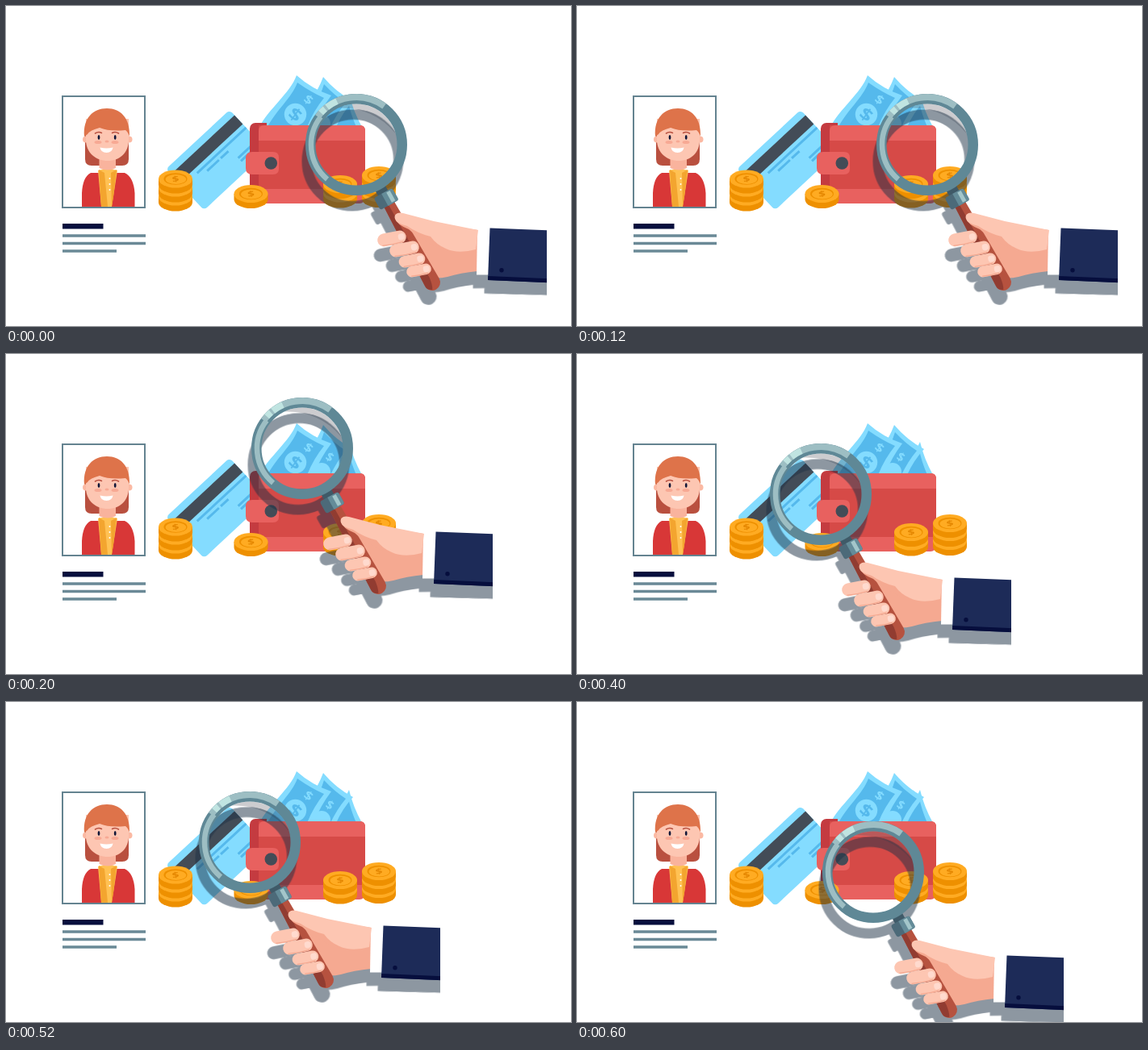
These frames come from a looping animation (700x397 px, 0.8 s). An HTML page:

```html
<!DOCTYPE html>
<html lang="en">
<head>
<meta charset="utf-8">
<title>Checking finances</title>
<style>
html, body { margin: 0; width: 100%; height: 100%; overflow: hidden; background: #fff; }
svg { display: block; width: 100vw; height: 100vh; }
text { font: bold 20px "Open Sans", sans-serif; text-anchor: middle; }
</style>
</head>
<body>
<svg viewBox="0 0 700 397">
  <defs>
    <clipPath id="edge"><rect x="340" y="90" width="330" height="300"/></clipPath>
    <clipPath id="purse"><rect x="302" y="145" width="143" height="100" rx="7"/></clipPath>
    <filter id="tint" color-interpolation-filters="sRGB">
      <feFlood flood-color="#1b2f43" flood-opacity=".5"/>
      <feComposite in2="SourceAlpha" operator="in"/>
    </filter>
    <g id="disc">
      <path d="M-21 0v7a21 11 0 0 0 42 0v-7z" fill="#ee9000"/>
      <ellipse rx="21" ry="11" fill="#ffab22"/>
    </g>
    <g id="face">
      <ellipse rx="14.5" ry="7.3" fill="#ee9000"/>
      <ellipse cx=".4" cy=".6" rx="12.8" ry="6" fill="#ffab22"/>
      <text transform="rotate(-12) scale(1.25 .8)" y="4.3" style="font-size:12px" fill="#e48600">$</text>
    </g>
  </defs>

  <!-- profile -->
  <rect x="70" y="112" width="102" height="138" fill="#fff" stroke="#648390" stroke-width="2"/>
  <path d="M98 152V190Q98 198 106 198H144Q152 198 152 190V152z" fill="#b9503f"/>
  <path d="M94 249V232Q95 212 105 207H147Q158 212 159.500 232V249z" fill="#d83737"/>
  <path d="M114 204L126 201 138 204 131 249H118z" fill="#ffc153"/>
  <path d="M115.500 188h20.500v13q-10 5-20.500 0z" fill="#f9b39d"/>
  <path d="M115 203l7 4 4 42h-8zM137 203l-7 4 1 42 2-12z" fill="#f3a52f"/>
  <g fill="#fff"><circle cx="128.500" cy="214" r="1"/><circle cx="128.500" cy="221" r="1"/><circle cx="128.500" cy="228" r="1"/></g>
  <g fill="#fbb9a3"><circle cx="99" cy="165.500" r="4"/><circle cx="152.500" cy="165.500" r="4"/></g>
  <path d="M99 140H152V166C152 182 141 192 126 192S99 182 99 166z" fill="#fdc6b2"/>
  <path d="M97 162C95 139 108 127 125 127S154 139 153 162Q151 156 148 154 128 156 116 151 104 154 101 159z" fill="#de734a"/>
  <path d="M110.500 158q4-2.500 8-.5M131.500 157.500q4-2 8 .5" fill="none" stroke="#b9503f" stroke-width="1.500" stroke-linecap="round"/>
  <g fill="#101638"><ellipse cx="115" cy="163" rx="1.400" ry="2.900"/><ellipse cx="135.200" cy="163" rx="1.400" ry="2.900"/></g>
  <g fill="#f7a994"><ellipse cx="114" cy="169" rx="4.500" ry="2"/><ellipse cx="135" cy="169" rx="4.500" ry="2"/><ellipse cx="125" cy="168" rx="2.500" ry="1.500"/></g>
  <path d="M116.500 175.500q8 2 16 0-1 6.500-8 6.500t-8-6.500z" fill="#fff"/>
  <rect x="70" y="270" width="50.500" height="6.500" fill="#060e3d"/>
  <path d="M70 285h103M70 294.500h103M70 304h67" stroke="#6a8996" stroke-width="3.700"/>

  <!-- card -->
  <g transform="translate(198 202.500) rotate(-43)">
    <rect width="108" height="69.500" rx="5" fill="#84dcff"/>
    <path d="M0 9H108V24H0z" fill="#434c57"/>
    <path d="M25 30H108M36 36.500H56M59 36.500H72M75 51H108M75 56H108" stroke="#55b9ec" stroke-width="3"/>
  </g>

  <!-- banknotes -->
  <g fill="#84dcff">
    <path d="M425 109Q430 130 441 150H395Q416 130 425 109z"/>
    <path d="M424 119Q427 134 434 150H402Q418 134 424 119z" fill="#55b9ec"/>
    <path d="M393 88Q409 107 430 118 417 132 409 150H350Q381 120 393 88z"/>
    <path d="M394 97Q407 111 421 120 410 133 402 150H360Q386 124 394 97z" fill="#55b9ec"/>
    <text transform="translate(401 128) rotate(32)" y="5" style="font-size:15px">$</text>
    <circle cx="391" cy="146" r="11"/>
    <path d="M360 86Q379 103 403 111 390 128 381 150H314C325 128 352 108 360 86z"/>
    <path d="M361 95Q378 107 394 114 381 130 373 150H324C334 130 354 114 361 95z" fill="#55b9ec"/>
    <circle cx="358.500" cy="134.500" r="13.700"/>
    <text transform="translate(375 116) rotate(36) scale(1.200 1)" y="5.500" style="font-size:15px">$</text>
    <text transform="translate(358.500 134.500) rotate(36) scale(1.250 1)" y="7.500" style="font-size:21px" fill="#55b9ec">$</text>
  </g>

  <!-- wallet -->
  <g clip-path="url(#purse)">
    <path d="M302 145H323V245H302z" fill="#c43b40"/>
    <path d="M302 227H445V245H302z" fill="#e8615f"/>
    <path d="M313 148H438Q445 148 445 155V227H313z" fill="#d64a47"/>
    <path d="M313 167V155Q313 148 320 148H438Q445 148 445 155V167z" fill="#e8615f"/>
  </g>
  <path d="M305 181H331Q338 181 338 188V202Q338 209 331 209H305Q297 209 297 201V189Q297 181 305 181z" fill="#e8615f"/>
  <circle cx="328.300" cy="195" r="7.800" fill="#434c57"/>
  <g id="coins"></g>

  <!-- magnifier and hand -->
  <g id="mover" clip-path="url(#edge)">
    <path d="M412 126.500A50.500 50.500 0 0 1 482.500 158A85 85 0 0 0 412 126.500z" fill="#44444f" opacity=".27"/>
    <!-- the shadow falls closer towards the sleeve -->
    <use href="#tool" transform="translate(-4.500 27) skewY(-1)" filter="url(#tint)"/>
    <g id="tool">
      <path d="M500 266L585 278 584 329Q563 331 547 336 529 340 519 334L498 300z" fill="#f5a991"/>
      <g transform="translate(434 172) rotate(-28.800)">
        <path d="M-7 78H7L10 195A10 10 0 0 1-10 195z" fill="#b6523f"/>
        <path d="M-7 78H-1L0 188Q-1 198-4 203-10 201-10 195z" fill="#913c31"/>
        <path d="M-7 60H7V70H-7z" fill="#3f5a68"/>
        <rect x="-13" y="68.500" width="26" height="17" rx="3" fill="#4c6a79"/>
        <path d="M-2 68.500H10Q13 68.500 13 71.500V82.500Q13 85.500 10 85.500H-2z" fill="#648c99"/>
        <path d="M4 70H9V84H4z" fill="#a3c6ca"/>
      </g>
      <g transform="translate(434 172)" fill="none">
        <circle r="56.750" stroke="#5f8896" stroke-width="12.500"/>
        <g stroke="#9dbec3">
          <path id="top" stroke-width="8"/>
          <path id="side" stroke-width="6.500"/>
        </g>
        <g stroke="#c0e4e1" stroke-width="8"><path id="glintA"/><path id="glintB"/></g>
      </g>
      <path d="M584 276L600 274 598 333.500H583z" fill="#fff"/>
      <path d="M599.500 275.500L690 279V344L597 340z" fill="#1d2b58"/>
      <path d="M597.300 335L690 339V344L597 340z" fill="#060e3d"/>
      <circle cx="614" cy="327.700" r="2.700" fill="#060e3d"/>
      <path d="M482 264L530 272 534 300Q510 288 499 277 484 271 482 264z" fill="#f5a991"/>
      <path d="M482 264C480 258 486 255 492 257L530 267 585 278 582 302Q560 308 545 301 533 296 526 286 510 282 497 273 484 270 482 264z" fill="#fdc6b2"/>
      <g id="fingers"></g>
    </g>
  </g>
</svg>
<script>
const $ = id => document.getElementById(id);

// stacks: x, y of the top face, coin count, step
const stacks = [[210, 214.500, 3, 11], [303.500, 233, 1, 0], [462, 210, 3, 11], [414, 221, 2, 11.500]];
$('coins').innerHTML = stacks.map(([x, y, n, step]) => {
  let s = '';
  for (let i = n - 1; i >= 0; i--) s += `<use href="#disc" x="${x}" y="${y + i * step}"/>`;
  return s + `<use href="#face" x="${x}" y="${y}"/>`;
}).join('');

// fingers: centre x, y, length, thickness
const fingers = [[478, 288.500, 36, 16], [493.500, 301.500, 37, 16], [503, 315.500, 33, 14.500], [511.500, 328, 31, 13.500]];
$('fingers').innerHTML = fingers.map(([x, y, w, h]) =>
  `<g transform="translate(${x} ${y}) rotate(-11)">
    <rect x="${-w / 2}" y="${-h / 2}" width="${w}" height="${h}" rx="${h / 2}" fill="#fdc6b2"/>
    <path d="M${-w / 2 + 5} ${h / 2 - 1.5}Q0 ${h / 2} ${w / 2 - 5} ${h / 2 - 1.5}" fill="none" stroke="#f5a991" stroke-width="1.300"/>
    <rect x="${w / 2 - 10}" y="-4" width="8" height="8" rx="3.500" fill="#ffdace"/>
  </g>`).join('');

function arc(id, r, from, to) {
  const at = a => [r * Math.cos(a * Math.PI / 180), r * Math.sin(a * Math.PI / 180)];
  $(id).setAttribute('d', `M${at(from)}A${r} ${r} 0 0 1 ${at(to)}`);
}
arc('top', 59, 216, 306);
arc('side', 56, 130, 218);
arc('glintA', 59, 222, 229);
arc('glintB', 59, 232, 246);

const stops = [[0, 0], [-67, -55], [-132, 2], [-67, 39]];
const start = performance.now();
function draw(now) {
  const i = Math.floor(Math.max(0, now - start) / 200) % stops.length;
  $('mover').setAttribute('transform', `translate(${stops[i]})`);
  requestAnimationFrame(draw);
}
draw(start);
</script>
</body>
</html>
```
